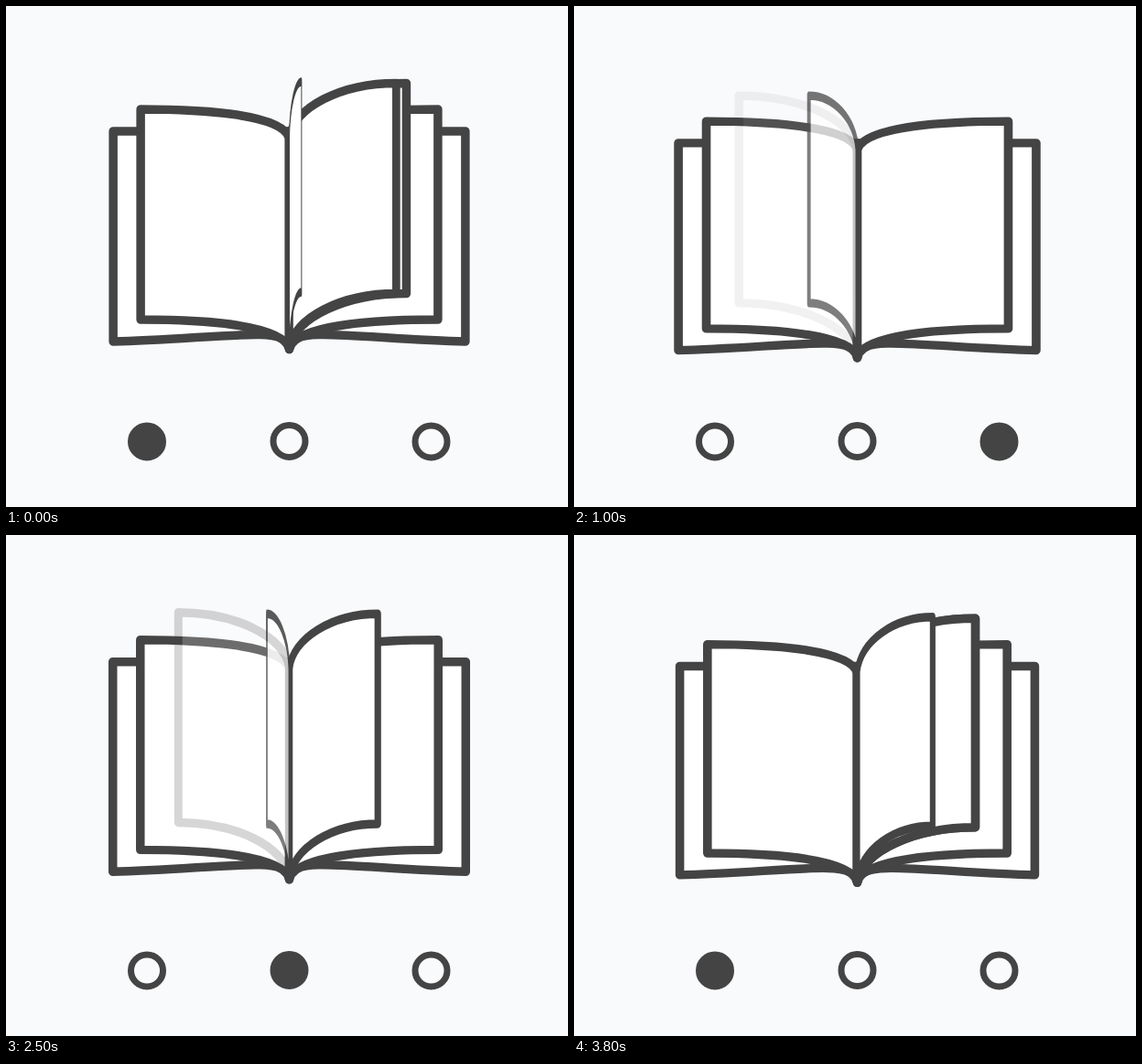
An HTML page for the animation above (3900 ms loop, 614 px wide and 548 px high).

```html
<!DOCTYPE html>
<html lang="en">
<head>
<meta charset="utf-8">
<title>Turning book loader</title>
<style>
  html, body { margin: 0; width: 100%; height: 100%; overflow: hidden; background: #f9fafc; }
  svg { display: block; width: 614px; height: 548px; }
  #book { fill: #fff; stroke: #444; stroke-width: 9.5; stroke-linejoin: round; }
  #dots { fill: #444; stroke: #444; stroke-width: 7; }
</style>
</head>
<body>
<svg viewBox="0 0 614 548">
  <defs>
    <path id="cover" d="M0 0C0-10-12-16-32-16C-60-17-130-10-192.5-8.5V-238.5H0Z"/>
    <path id="sheet" d="M0-231C-8-258-100-262.5-162.5-262.5V-32.5C-100-32.5-8-28 0-1Z"/>
  </defs>
  <g id="book">
    <use href="#cover"/><use href="#cover" transform="scale(-1 1)"/>
    <use href="#sheet"/><use href="#sheet" transform="scale(-1 1)"/>
  </g>
  <g id="dots">
    <circle cx="154" cy="476.5" r="17.5"/>
    <circle cx="309.5" cy="476" r="17.5"/>
    <circle cx="464.5" cy="476.5" r="17.5"/>
  </g>
</svg>
<script>
const LOOP = 3900, STEP = 100, CYCLE = 2000;
const FLIP = 1200, FLIP_START = 1440, STAGGER = 400;
const DOT_START = 1530, DOT_FADE = 120;
const PAGE = 'M0-231C6-265 62-291 128-291V-61C62-61 6-35 0-1Z';
// The pace runs slightly fast, then slows before the loop restarts.
const PACE = [[0, 0], [1000, 1000], [3000, 3018], [3900, 3870]];

const book = document.getElementById('book');
const dots = [...document.querySelectorAll('#dots circle')];
const clamp = v => Math.max(0, Math.min(1, v));
const wrap = t => (t % CYCLE + CYCLE) % CYCLE;

// The first page to turn lies on top, so it is appended last.
const pages = [2, 1, 0].map(order => {
  const path = document.createElementNS('http://www.w3.org/2000/svg', 'path');
  path.setAttribute('d', PAGE);
  book.append(path);
  return { path, order };
});

function pace(t) {
  const i = PACE.findIndex(([time]) => time > t);
  const [[t0, p0], [t1, p1]] = [PACE[i - 1], PACE[i]];
  return p0 + (p1 - p0) * (t - t0) / (t1 - t0);
}

function drawBook(phase) {
  const angle = 2 * Math.PI * (phase - 225) / CYCLE;
  const drop = 0.48 - 0.67 * Math.cos(angle) - 0.1 * Math.cos(2 * angle);
  book.setAttribute('transform',
    `translate(309.5 ${376 + 9.2 * drop}) scale(${1 + 0.0156 * drop} ${1 - 0.0145 * drop})`);
}

// Pages turn one after another and all return when the last one is over.
function drawPage({ path, order }, phase) {
  const turn = clamp((wrap(phase - FLIP_START) - order * STAGGER) / FLIP);
  const lift = order === 0 ? -1.5 : 0;
  path.setAttribute('transform', `translate(0 ${lift}) scale(${Math.cos(Math.PI * turn)} 1)`);
  path.setAttribute('opacity', clamp(2 - 2 * turn));
}

function drawDot(dot, index, phase) {
  const slot = CYCLE / 3;
  const time = wrap(phase - DOT_START - index * slot);
  dot.style.fillOpacity = clamp(time / DOT_FADE) * clamp(1 - (time - slot) / DOT_FADE);
}

function render(now) {
  const t = Math.floor(now % LOOP / STEP) * STEP;
  const phase = pace(t);
  drawBook(phase);
  pages.forEach(page => drawPage(page, phase));
  dots.forEach((dot, i) => drawDot(dot, i, phase));
}

const start = performance.now();
function tick() {
  render(performance.now() - start);
  requestAnimationFrame(tick);
}
tick();
</script>
</body>
</html>
```
